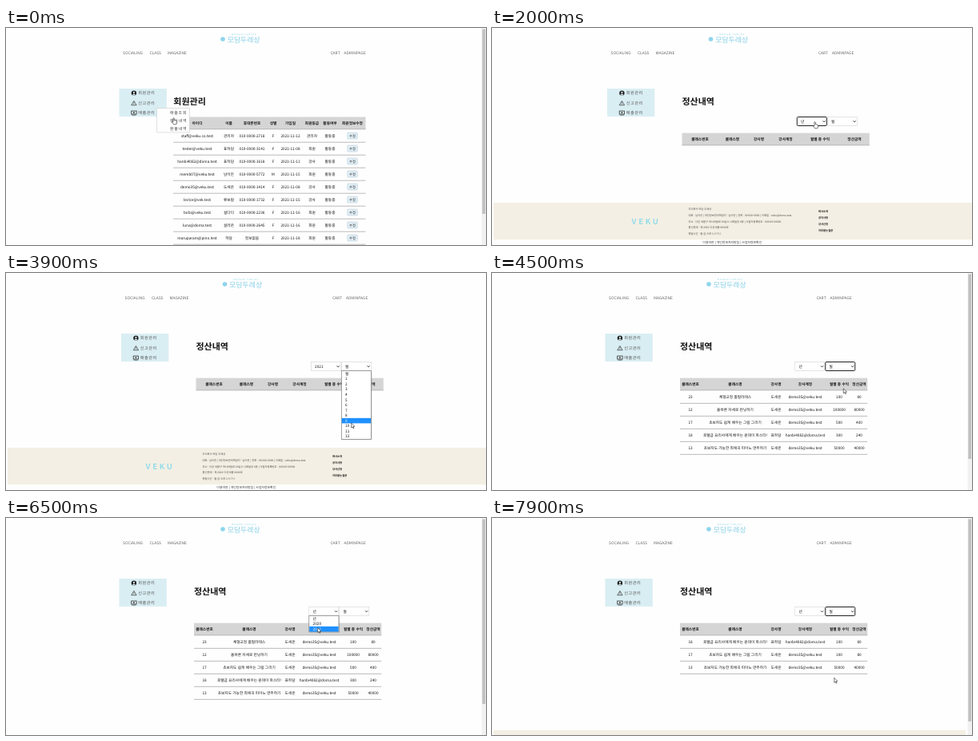
An HTML page that plays this animation: 600 by 272 pixels, repeating every 8000 ms.

```html
<!DOCTYPE html>
<html lang="ko">
<head>
<meta charset="utf-8">
<style>
html, body { margin: 0; width: 100%; height: 100%; overflow: hidden; background: #fefefe; }
svg { display: block; width: 600px; height: 272px; font-family: "Noto Sans CJK KR", "Noto Sans CJK", "Noto Sans", sans-serif; }
text { white-space: pre; text-rendering: geometricPrecision; }
</style>
</head>
<body>
<svg id="stage" viewBox="0 0 600 272"></svg>
<script>
const LOOP = 8000, STEP = 100, BAR_SHIFT = -2.5;
const stage = document.getElementById('stage');

// y is the vertical middle of the text
const text = (s, x, y, size, o = {}) =>
  `<text x="${x}" y="${y + size * .36}" font-size="${size}" fill="${o.fill || '#111'}"` +
  ` font-weight="${o.weight || 400}" text-anchor="${o.anchor || 'start'}"` +
  ` letter-spacing="${o.gap || 0}">${s}</text>`;
const mid = (s, x, y, size, o) => text(s, x, y, size, { anchor: 'middle', ...o });
const rect = (x, y, w, h, fill, more = '') =>
  `<rect x="${x}" y="${y}" width="${w}" height="${h}" fill="${fill}" ${more}/>`;
const path = (d, more) => `<path d="${d}" ${more}/>`;
const shift = (x, y, s) => `<g transform="translate(${x} ${y})">${s}</g>`;

const DEMO = ['도새온', 'demo35@veku.test'];
const PASTA = ['호텔급 요리사에게 배우는 원데이 파스타!', '표하담', 'hanbi4082@doma.test'];
const DRAWING = ['초보자도 쉽게 배우는 그림 그리기', ...DEMO];
const PIANO = ['초보자도 가능한 최애곡 피아노 연주하기', ...DEMO];
const AUTUMN = [
  [23, '체형교정 홈필라테스', ...DEMO, 100, 80],
  [12, '올바른 자세로 런닝하기', ...DEMO, 100000, 80000],
  [17, ...DRAWING, 500, 400],
  [18, ...PASTA, 300, 240],
  [13, ...PIANO, 50000, 40000]
];
const WINTER = [
  [18, ...PASTA, 100, 80],
  [17, ...DRAWING, 100, 80],
  [13, ...PIANO, 50000, 40000]
];
const MEMBERS = [
  ['staff@veku.co.test', '관리자', '010-0000-2718', 'F', '12', '관리자'],
  ['tester@veku.test', '표하담', '010-0000-3141', 'F', '08', '회원'],
  ['hanbi4082@doma.test', '표하담', '010-0000-1618', 'F', '11', '강사'],
  ['memb07@veku.test', '남이든', '010-0000-5772', 'M', '15', '회원'],
  ['demo35@veku.test', '도새온', '010-0000-1414', 'F', '08', '강사'],
  ['lector@vek.test', '류보람', '010-0000-1732', 'F', '15', '강사'],
  ['bobi@veku.test', '설다다', '010-0000-2236', 'F', '16', '회원'],
  ['luna@doma.test', '설라온', '010-0000-2645', 'F', '16', '회원'],
  ['maruparam@pino.test', '하담', '정보없음', 'F', '18', '회원']
].map(r => [...r.slice(0, 4), '2021-11-' + r[4], r[5], '활동중']);

const MEMBER_COLS = [239, 278.5, 307.5, 334, 355.5, 382.5, 405, 433];
const MEMBER_HEAD = ['아이디', '이름', '휴대폰번호', '성별', '가입일', '회원등급', '활동여부', '회원정보수정'];
const PAY_COLS = [248, 304, 355, 391.5, 434, 459];
const PAY_EMPTY_COLS = [260, 300.5, 333.5, 367, 410, 453];
const PAY_HEAD = ['클래스번호', '클래스명', '강사명', '강사계정', '월별 총 수익', '정산금액'];
const YEARS = ['년', '2020', '2021'];
const MONTHS = ['월', ...Array.from({ length: 12 }, (_, i) => i + 1)];
const ITEM_H = 6.56, LIST_Y = 122.5;

function table(x, y, w, cols, head, rows) {
  let s = rect(x, y, w, 15.5, '#d5d5d5') + rect(x, y + 15, w, .7, '#a8a8a8');
  head.forEach((h, i) => s += mid(h, cols[i], y + 8, 4.7, { weight: 700 }));
  rows.forEach((row, r) => {
    const cy = y + 24 + r * 16;
    row.forEach((c, i) => s += mid(c, cols[i], cy, 4.7));
    s += rect(x, cy + 7.3, w, .7, '#a0a0a0');
  });
  return s;
}

const title = (s, x) => text(s, x, 92.1, 11, { weight: 700 });

function header(scrolled) {
  const nav = [['SOCIALING', 148.5], ['CLASS', 182], ['MAGAZINE', 204.5], ['CART', 408], ['ADMINPAGE', 425]];
  const tag = mid('MODAM TABLES', 300, 7.6, 2.8, { fill: '#86cfe6', gap: .9 });
  return '<circle cx="273.5" cy="14" r="2.8" fill="#8ed5ec"/>' +
    tag + (scrolled ? rect(272, 4, 56, 3, '#fefefe') : '') +
    mid('모담두레상', 299.7, 15.2, 8.9, { fill: '#86cfe6', weight: 300 }) +
    nav.map(([s, x]) => text(s, x, 31.7, 4.9, { fill: '#666' })).join('');
}

function sideMenu() {
  const icons = [
    '<circle r="3.2" fill="#222"/><circle cy="-.7" r="1.1" fill="#d9eef3"/>' +
      path('M-2 2.8Q-1.8.9 0 .9T2 2.8Z', 'fill="#d9eef3"'),
    path('M0-2.7L3.2 2.7H-3.2Z', 'fill="none" stroke="#333" stroke-width=".7" stroke-linejoin="round"') +
      path('M0-1V.9M0 1.5V2', 'stroke="#333" stroke-width=".6"'),
    rect(-3.2, -2.4, 6.4, 4, 'none', 'stroke="#333" stroke-width=".8"') +
      '<circle cy="-.4" r="1" fill="#444"/>' + path('M-2.6 2.7H2.6', 'stroke="#333" stroke-width=".7"')
  ];
  return rect(144, 76, 59.3, 35, '#d9eef3') + ['회원관리', '신고관리', '매출관리'].map((s, i) => {
    const y = 81.6 + i * 12.4;
    return shift(162.4, y, icons[i]) + text(s, 167.7, y, 5.2, { fill: '#555', gap: .5 });
  }).join('');
}

function footer(y, w) {
  const lines = [
    '주식회사 모담 두레상',
    '대표 : 남이든 | 개인정보관리책임자 : 남이든 | 전화 : 00-000-0000 | 이메일 : veku@doma.test',
    '주소 : 다온 새봄구 하늬바람로 00길 0 나래빌딩 0층 | 사업자등록번호 : 000-00-00000',
    '통신판매 : 제 2021-다온새봄-0000호',
    '영업시간 : 월-금 오후 1시-7시'
  ];
  const links = ['회사소개', '공지사항', '강사신청', '자주묻는질문'];
  return rect(2, y, w, 46.3, '#f4efe4') + shift(0, y,
    text('VEKU', 174.5, 23.5, 9.6, { weight: 700, fill: '#92dcea', gap: 2.7 }) +
    lines.map((s, i) => text(s, 245.5, 8 + i * 7.75, 3.25, { fill: '#444' })).join('') +
    links.map((s, i) => text(s, 408, 11 + i * 7.85, 3.3, { weight: 700 })).join('') +
    mid('이용약관 | 개인정보처리방침 | 사업자정보확인', 300.3, 50, 3.87, { fill: '#333' }));
}

function scrollbar(end) {
  return rect(594.5, 0, 5.5, 272, '#f1f1f1') + rect(595.3, 1.5, 3.9, end - 1.5, '#c1c1c1');
}

function members() {
  const buttons = MEMBERS.map((_, i) =>
    rect(426.8, 131.2 + i * 16, 12.4, 7.8, '#e3f0f7', 'rx=".8" stroke="#b3cad6" stroke-width=".6"') +
    mid('수정', 433, 135.2 + i * 16, 4.3)).join('');
  const items = ['매출조회', '정산내역', '환불내역'].map((s, i) =>
    text(s, 205, 106 + i * 10.1, 5, { fill: '#444', gap: .7 })).join('');
  return title('회원관리', 209.3) +
    table(209, 111.5, 240.5, MEMBER_COLS, MEMBER_HEAD, MEMBERS) + buttons +
    rect(188.7, 100.3, 40.6, 30.6, '#fefefe', 'stroke="#ccc" stroke-width=".6"') + items;
}

function select(x, label, focused) {
  const edge = focused ? 'stroke="#222" rx="1.2"' : 'stroke="#d4d4d4" stroke-width=".6"';
  return rect(x, 111.5, 37, 11, '#fff', edge) + text(label, x + 4.8, 117.2, 4.7) +
    path(`M${x + 32.3} 116.3l1.5 1.6l1.5-1.6`, 'fill="none" stroke="#222" stroke-width=".9"');
}

function list(x, items, hover) {
  const h = items.length * ITEM_H + .6;
  return rect(x + .6, LIST_Y + .8, 37.6, h, '#000', 'opacity=".15"') +
    rect(x, LIST_Y, 37.2, h, '#fff', 'stroke="#777" stroke-width=".7"') +
    items.map((s, i) => {
      const y = LIST_Y + .3 + i * ITEM_H, on = i === hover;
      return (on ? rect(x + .4, y, 36.4, ITEM_H, '#1e90ff') : '') +
        text(s, x + 4.8, y + ITEM_H / 2, 4.7, { fill: on ? '#fff' : '#111' });
    }).join('');
}

// time, tip x, tip y
const PATH = [
  [0, 209, 113], [400, 209, 113], [900, 240, 118], [1700, 403, 118], [2100, 403, 118],
  [2500, 392, 139], [2600, 392, 139], [3000, 438, 117], [3200, 438, 118], [3800, 432, 185],
  [3900, 431.7, 188], [4100, 431.5, 191], [4200, 432, 191], [4500, 439.3, 144.8],
  [5000, 434, 194], [5300, 432, 186], [5500, 425, 143], [5900, 393, 117], [6050, 392, 117],
  [6400, 389.7, 137], [6600, 389.7, 138], [6800, 434, 117], [6900, 432, 135],
  [7000, 431.3, 165], [7100, 431, 181], [7250, 429, 200], [7900, 427.8, 200.3], [8000, 427.8, 200.3]
];
function tip(t) {
  const i = Math.max(1, PATH.findIndex(p => p[0] >= t));
  const [a, b] = [PATH[i - 1], PATH[i]];
  const k = (t - a[0]) / (b[0] - a[0]);
  return [a[1] + (b[1] - a[1]) * k, a[2] + (b[2] - a[2]) * k];
}
// the highlight trails the pointer by one step
function hovered(t, count) {
  const i = Math.floor((tip(t - STEP)[1] - LIST_Y) / ITEM_H);
  return Math.min(count - 1, Math.max(0, i));
}
function cursor(t) {
  const hand = t < 500 || (t >= 1500 && t < 2200);
  const d = hand
    ? 'M0 0Q.8-.7 1.3.2V2.7L2.2 2.6L3.1 3L4.1 3.2L4.6 4V6L3.8 7.8H.6L-1.4 5Q-1.4 4-.3 4.4L0 4.7Z'
    : 'M0 0V6L1.4 4.8L2.3 6.9L3.2 6.5L2.3 4.4H4.2Z';
  return shift(...tip(t), path(d, 'fill="#fff" stroke="#222" stroke-width=".6" stroke-linejoin="round"'));
}

const within = (t, ...spans) => spans.some(([a, b]) => t >= a && t < b);

function settlement(t, rows) {
  const x = rows.length ? BAR_SHIFT : 0;
  const year = within(t, [2600, 4200], [6600, 7400]) ? '2021' : '년';
  let s = title('정산내역', 237.5 + x) +
    table(237.5 + x, 131.6, 234.3, rows.length ? PAY_COLS : PAY_EMPTY_COLS, PAY_HEAD, rows) +
    select(381.3 + x, year, within(t, [1800, 3100], [6600, 6800])) +
    select(419.3 + x, '월', within(t, [4200, 6000], [7400, LOOP]));
  if (within(t, [2100, 2600], [6000, 6600])) s += list(381.3 + x, YEARS, hovered(t, 3));
  if (within(t, [3100, 4200], [6800, 7400])) s += list(419.3 + x, MONTHS, hovered(t, 13));
  return s;
}

function draw(t) {
  const onMembers = t < 400;
  const rows = within(t, [4200, 6600]) ? AUTUMN : t >= 7400 ? WINTER : [];
  const scrolled = onMembers || rows.length > 0;
  const common = shift(scrolled ? BAR_SHIFT : 0, 0, header(scrolled) + sideMenu());
  let s = common + (onMembers ? members() : settlement(t, rows));
  if (!scrolled) s += footer(219, 598);
  else if (rows === WINTER) s += footer(266, 590);
  if (scrolled) s += scrollbar(rows === WINTER ? 255 : 233);
  stage.innerHTML = s + cursor(t);
}

let shown = -1;
function tick() {
  const t = Math.floor(performance.now() % LOOP / STEP) * STEP;
  if (t !== shown) draw(shown = t);
  requestAnimationFrame(tick);
}
tick();
</script>
</body>
</html>
```
